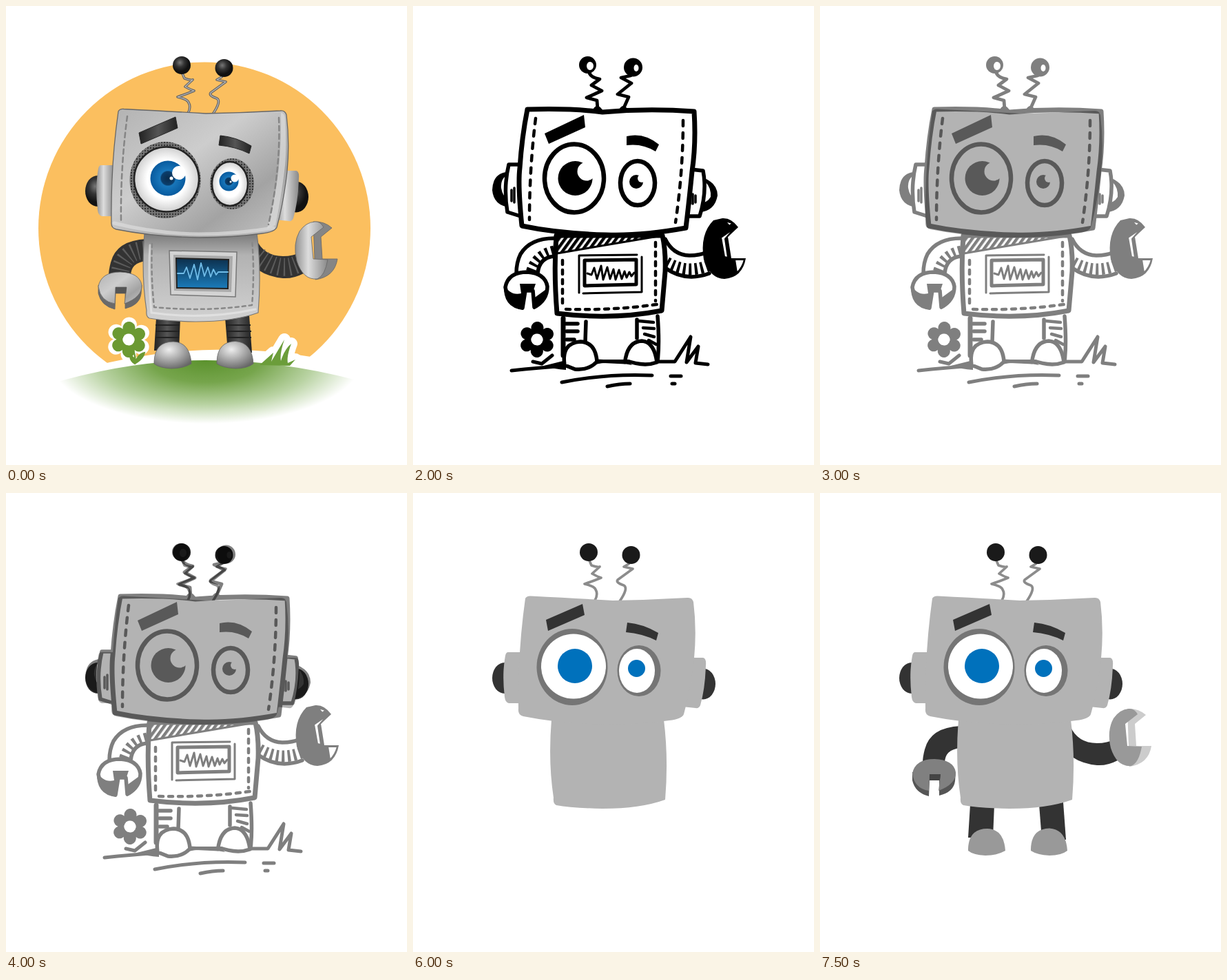
Write an HTML page that moves like this. It is 582 px wide and 666 px high and loops after 8 s.

```html
<!DOCTYPE html>
<html lang="en">
<head>
<meta charset="utf-8">
<title>Drawing a robot</title>
<style>
html, body { margin: 0; width: 100%; height: 100%; overflow: hidden; background: #fff; }
svg { display: block; width: 100%; height: 100%; }
.line { fill: none; stroke-linecap: round; stroke-linejoin: round; }
.pen { fill: #fff; stroke-linecap: round; stroke-linejoin: round; }
.open { fill: none; }
#ink { stroke: #000; stroke-width: 5.5; mix-blend-mode: multiply; }
#red { stroke: #b51f29; stroke-width: 5.5; }
.solid { fill: #000; stroke: none; }
.blood { fill: #b51f29; stroke: none; }
.white { fill: #fff; stroke: none; }
</style>
</head>
<body>
<svg viewBox="0 0 582 666">
<defs>
  <linearGradient id="steel" x2="1" y2="1"><stop stop-color="#b2b2b2"/><stop offset=".4" stop-color="#cdcdcd"/><stop offset=".72" stop-color="#a3a3a3"/><stop offset="1" stop-color="#c6c6c6"/></linearGradient>
  <linearGradient id="chest" x2="0" y2="1"><stop stop-color="#777"/><stop offset=".25" stop-color="#b2b2b2"/><stop offset="1" stop-color="#d2d2d2"/></linearGradient>
  <linearGradient id="plate"><stop stop-color="#909090"/><stop offset=".4" stop-color="#ddd"/><stop offset="1" stop-color="#888"/></linearGradient>
  <linearGradient id="rubber"><stop stop-color="#222"/><stop offset=".5" stop-color="#555"/><stop offset="1" stop-color="#222"/></linearGradient>
  <linearGradient id="screen" x2="0" y2="1"><stop stop-color="#0c2f4c"/><stop offset="1" stop-color="#1b7cbb"/></linearGradient>
  <radialGradient id="ball" cx=".4" cy=".35"><stop stop-color="#777"/><stop offset=".5" stop-color="#333"/><stop offset="1" stop-color="#111"/></radialGradient>
  <radialGradient id="toe" cx=".4" cy=".3" r=".75"><stop stop-color="#eee"/><stop offset=".5" stop-color="#aaa"/><stop offset="1" stop-color="#666"/></radialGradient>
  <radialGradient id="eyeball"><stop offset=".6" stop-color="#fff"/><stop offset="1" stop-color="#cfcfcf"/></radialGradient>
  <radialGradient id="iris"><stop stop-color="#0a2c4c"/><stop offset=".38" stop-color="#0b3e6c"/><stop offset=".45" stop-color="#1977bb"/><stop offset="1" stop-color="#075a9e"/></radialGradient>
  <radialGradient id="meadow" gradientUnits="userSpaceOnUse" cx="0" cy="0" r="1" gradientTransform="translate(290 514) scale(226 92)"><stop stop-color="#5b922d"/><stop offset=".35" stop-color="#76a54c"/><stop offset=".7" stop-color="#b9d3a3"/><stop offset="1" stop-color="#fff"/></radialGradient>
  <pattern id="hatch" width="7.5" height="8" patternUnits="userSpaceOnUse" patternTransform="rotate(36)"><path d="M2 0V8" stroke="#000" stroke-width="4.8"/></pattern>
  <pattern id="mesh" width="4" height="4" patternUnits="userSpaceOnUse"><path d="M0 0h4v4h-4z" fill="#777"/><circle cx="2" cy="2" r="1.2" fill="#333"/></pattern>

  <path id="head" d="M163 153Q165 149 171 149.500Q240 153 290 156Q345 155 398 152Q405 151 407 158Q412 198 408 240Q403 285 393 321Q390 328 372 330Q330 336 280 336Q215 335 160 324Q152 322 153 313Q152 230 163 153Z"/>
  <path id="body" d="M201 329H364Q371 385 366 445Q330 458 275 458Q230 457 208 453Q203 451 204 442Q196 390 201 329Z"/>
  <path id="earL" d="M138 231H157V305H139Q134 304 133 296Q129 262 134 236Q135 231 138 231Z"/>
  <path id="earR" d="M405 239H421Q426 240 425 250Q424 284 417 308Q415 313 410 312L391 310Z"/>
  <path id="armL" d="M204 338Q160 340 152 372Q149 383 149 392H181Q181 372 204 370Z"/>
  <path id="armR" d="M363 338Q374 363 402 363Q417 363 428 357L432 388Q417 396 402 395Q381 393 366 383Z"/>
  <path id="legL" d="M218 452H253L251 500H215Z"/>
  <path id="legR" d="M318 452L353 449L357 503H322Z"/>
  <path id="footL" d="M215 516Q216 487 243 487Q267 488 269 519Q257 526 240 526Q222 525 215 519Z"/>
  <path id="footR" d="M306 516Q307 487 333 486.500Q357 488 359 519Q350 526 333 526Q315 525 306 519Z"/>
  <path id="clawL" d="M134 407Q138 386 166 386Q194 387 197 405Q198 422 172 432L175 408H159L158 432Q137 429 134 407Z"/>
  <path id="clawLSide" d="M134 405V417Q138 435 158 440L159 417H173V439Q194 434 196 418L197 405Z"/>
  <path id="clawR" d="M448 313Q456 312 461 321L443 335L446 367L467 368Q463 391 452 396Q431 398 422 370Q416 345 426 327Q435 314 448 313Z"/>
  <path id="clawRSide" d="M446 313Q462 312 473 322L457 335L459 367H481Q477 393 449 397Z"/>
  <path id="springs" d="M256 98L259 105Q267 108 271 107L260 117Q269 122 273 123Q261 128 249 132Q263 135 265 140Q269 147 264 156M313 103L306 107L319 110L297 126Q294 130 306 134Q313 138 300 157"/>
  <path id="browL" d="M193 184L246 161L249 177L196 200Z"/>
  <path id="browR" d="M311 188Q334 190 356 203L353 214Q333 204 309 202Z"/>
  <path id="wave" class="line" d="M249 388l9 0 4-9 5 16 6-20 5 22 5-24 5 19 5-13 4 14 4-11 4 8 3-4h14"/>
  <path id="scribble" class="line" d="M253 388l6 2 4-10 4 16 6-19 3 20 6-18 4 17 5-14 3 15 5-14 4 13 4-11 3 9 4-8 3 6 4-5"/>
  <g id="flower" fill="none" transform="rotate(30)"><circle r="17" stroke-width="18" stroke-linecap="round" stroke-dasharray="0 17.802"/><circle r="13" stroke-width="9"/><circle r="8.500" fill="#fff" stroke="none"/></g>
  <path id="grass" d="M368 521L388 503L385 516L404 484Q397 505 399 515Q404 498 414 490Q407 509 409 518L420 513L412 522Z"/>
</defs>

<path fill="#fff" d="M0 0H582V666H0Z"/>

<g id="flat" fill="#b3b3b3">
  <g data-show="6500 8000">
    <g fill="#333"><use href="#legL"/><use href="#legR"/></g>
    <g fill="#999"><use href="#footL"/><use href="#footR"/></g>
  </g>
  <g data-show="7000 8000" fill="#333"><use href="#armL"/><use href="#armR"/></g>
  <g data-show="7500 8000">
    <use href="#clawLSide" fill="#555"/><use href="#clawL" fill="#808080"/><path d="M159 408h16l-1 9h-15z" fill="#444"/>
    <use href="#clawRSide" fill="#ccc"/><use href="#clawR" fill="#999"/>
  </g>
  <use href="#body" data-show="6000 8000"/>
  <g data-show="3500 8000">
    <g fill="#333"><ellipse cx="133" cy="268.500" rx="18" ry="22.500"/><ellipse cx="421" cy="277" rx="18" ry="22.500"/></g>
    <use href="#earL"/><use href="#earR"/>
  </g>
  <g data-show="4000 8000">
    <use href="#springs" class="line" stroke="#8c8c8c" stroke-width="3.700"/>
    <g fill="#1a1a1a"><circle cx="255" cy="86" r="13"/><circle cx="316.500" cy="90" r="13"/></g>
  </g>
  <use href="#head" data-show="3000 8000"/>
  <g data-show="4500 8000">
    <g fill="#757575"><ellipse cx="231" cy="252.500" rx="51.500" ry="55.500"/><ellipse cx="328" cy="258" rx="31.500" ry="37"/></g>
    <g fill="#fff"><ellipse cx="233" cy="251.500" rx="47" ry="47"/><ellipse cx="325" cy="258" rx="26" ry="32"/></g>
    <g fill="#0071bc"><circle cx="235" cy="251" r="25"/><circle cx="324.500" cy="254.500" r="12.500"/></g>
  </g>
  <g data-show="5500 8000" fill="#333"><use href="#browL"/><use href="#browR"/></g>
</g>

<g id="ink" class="pen" data-show="2000 5000">
  <g class="open">
    <path d="M218 453V507" stroke-width="7"/>
    <path d="M251 458L250 487M222 461h17M223 472h16M223 484h11M325 455V482M355 450Q358 490 355 515"/>
    <path d="M328 457L349 459M334 467L350 468M336 476L350 480M342 485L353 491" stroke-width="4.500"/>
    <path d="M143 529Q180 525 224 522M266 515L308 517M352 516H380L403 480L397 517L414 494L410 518L428 520M216 546Q280 533 347 536M282 552Q300 548 315 548M374 537h15M376 548h4M174 516L187 519L202 507" stroke-width="5"/>
    <path d="M205 337Q170 337 156 360Q150 372 150 388M205 363Q183 365 181 388M366 338Q377 361 401 362Q416 362 427 357M366 380Q395 401 430 388"/>
    <path d="M205 356Q179 361 172 387M368 372Q397 389 428 377" stroke-width="17" stroke-linecap="butt" stroke-dasharray="4 4.500"/>
  </g>
  <path class="solid" d="M190 522L222 514V528Q205 527 190 522ZM262 513H308L318 521Q285 515 264 520Z"/>
  <path d="M220 521Q215 489 243 487Q265 488 267 516Q255 529 235 527ZM308 514Q312 487 332 486Q350 487 354 517Q335 524 308 514Z"/>
  <use href="#flower" x="180" y="484"/>
  <path d="M134 408Q138 386 166 386Q192 388 195 407Q195 427 176 437L174 413H163L159 438Q138 434 134 408Z"/>
  <path class="solid" d="M132 404Q141 421 157 417L155 403H178L174 415H164L160 441Q130 438 132 404ZM174 425L196 409Q194 433 175 440Z"/>
  <path class="solid" d="M449 308Q462 307 472 321L457 335L462 366H483Q478 394 452 396Q432 396 422 368Q416 331 436 311Z"/>
  <path d="M466 323L447 336L452 364L457 365L453 338ZM467 368H481Q478 380 470 387ZM453 312L464 315L459 319Z" stroke-width="2"/>
  <path d="M208 333Q204 385 209 446Q290 456 361 442L366 385Q367 355 362 333Z" stroke-width="7"/>
  <path d="M209 333H362L209 359Z" fill="url(#hatch)" stroke-width="3"/>
  <g class="open">
    <path d="M217 369V437M222 440Q290 442 354 433M352 343V428" stroke-width="4.500" stroke-dasharray="6 8"/>
    <path d="M241 416V362L325 361M332 364V415L247 417" stroke-width="3"/>
    <path d="M249 369L324 368V404L249 406Z" stroke-width="5"/>
    <use href="#scribble" stroke-width="3"/>
  </g>
  <path class="solid" d="M136 241Q116 243 115 267Q117 290 141 292Z"/><path class="white" d="M134 247Q127 253 128 264Q130 276 138 281V247Z"/>
  <path class="solid" d="M421 249Q442 257 442 275Q438 297 417 299Z"/><path class="white" d="M425 256Q433 264 432 277Q427 285 419 286Z"/>
  <path d="M153 230H139Q131 263 137 299L156 305M403 237L421 239Q427 270 416 305L396 305"/>
  <path class="open" d="M143 267v16M147 264v21M402 272v15M406 273v14M410 275v10" stroke-width="3.500"/>
  <path class="open" d="M256 97Q258 104 271 106L259 115L274 123L252 133L267 137L268 150M316 101L302 104L317 112L297 128L313 132L305 150" stroke-width="4.800"/>
  <path class="solid" d="M259 154Q267 136 277 154ZM297 154Q305 136 314 154Z"/>
  <g class="solid"><circle cx="253.500" cy="85.500" r="12.500"/><circle cx="319.500" cy="89" r="13.500"/></g>
  <g class="white"><ellipse cx="257" cy="87" rx="5" ry="6"/><ellipse cx="324" cy="90" rx="3.500" ry="5"/></g>
  <path d="M166 150Q230 148 275 154Q340 148 408 153Q411 200 405 240Q400 290 396 322Q330 334 280 332Q210 330 158 319Q152 260 155 235Q158 190 166 150Z" stroke-width="7"/>
  <path class="open" d="M178 163Q169 235 169 310M392 166Q392 240 381 314" stroke-width="4.500" stroke-dasharray="8 10"/>
  <g stroke-width="6.500"><ellipse cx="234" cy="250" rx="43" ry="49.500"/><ellipse cx="326" cy="257" rx="25" ry="32"/></g>
  <g class="solid"><circle cx="235.500" cy="250" r="25"/><circle cx="324" cy="255" r="10"/><path d="M191 185L248 158L250 176L197 200ZM310 189Q335 183 357 201L352 211Q333 199 310 202Z"/></g>
  <g class="white"><circle cx="252" cy="240" r="13.500"/><circle cx="332" cy="250" r="6"/></g>
</g>

<g data-show="1000 2000">
<use href="#red" transform="translate(2 -1.500)" opacity=".3"/>
<g id="red" class="pen">
  <g class="open">
    <path d="M217 455V500M245 456V487M325 455V482M354 450Q356 490 352 513"/>
    <path d="M221 462h23M220 471h24M222 480h18M327 461h24M329 472h23M333 482h18" stroke-width="5" opacity=".7"/>
    <path d="M142 526Q175 519 216 519M264 514L303 517M354 516H376M412 518L428 520"/>
    <path d="M376 517L390 503L387 516L404 480L397 517L413 494L410 518" stroke-width="7"/>
    <path d="M212 545Q275 530 348 536M276 550Q295 549 313 547M364 542h9" opacity=".65"/>
    <path d="M205 335Q168 336 154 360Q149 372 149 385M203 363Q180 368 179 386M366 340Q377 360 401 361Q416 361 426 356M366 379Q395 397 428 386" stroke-width="4.500"/>
    <path d="M203 350Q171 351 164 386M369 364Q395 381 427 372" stroke-width="23" stroke-linecap="butt" stroke-dasharray="3.500 5"/>
    <path d="M183 500V514" stroke-width="6"/>
  </g>
  <path d="M218 517Q214 486 242 485Q263 487 266 515Q252 523 235 522ZM304 514Q309 485 330 483Q350 486 353 516Q335 523 304 516Z"/>
  <use href="#flower" x="177" y="479" transform="translate(177 479) scale(.9) translate(-177 -479)" opacity=".85"/>
  <path d="M130 408Q136 384 164 384Q191 387 194 407Q193 423 176 431L174 405L157 405L158 435Q132 433 130 408Z"/>
  <path class="open" d="M136 414Q143 426 157 425M157 405L162 410V431M176 422Q190 419 193 407" stroke-width="5"/>
  <path d="M448 307Q460 305 467 320L447 333L453 364L480 362Q475 389 450 394Q430 393 422 366Q416 331 434 313Z"/>
  <path class="open" d="M461 316L441 333L445 365L462 368Q460 386 450 393" stroke-width="4"/>
  <path d="M207 333Q200 385 205 445Q290 454 360 443Q367 385 362 333Z"/>
  <path class="blood" opacity=".55" d="M211 330H362L352 340L211 356Z"/>
  <path class="open" d="M216 361V428M218 438L354 432M352 341V429" stroke-width="4" stroke-dasharray="13 7" opacity=".5"/>
  <g class="open"><path d="M240 359H328V412H240Z" stroke-width="3" opacity=".5"/><path d="M245 367H322V404H245Z"/><use href="#scribble" x="-4" y="-4" stroke-width="3.500" opacity=".85"/></g>
  <path d="M136 238Q115 240 114 263Q116 290 140 294M420 249Q439 256 438 273Q434 292 414 295"/>
  <path class="open" d="M127 243Q119 265 130 287M430 256Q434 273 424 291"/>
  <path d="M150 228H138Q131 262 137 296L152 302M405 237L419 240Q425 270 413 302L397 303M146 240Q142 265 148 292"/>
  <path class="blood" opacity=".65" d="M137 260h7v30h-7zM404 263h9l-3 30h-8z"/>
  <path class="open" d="M255 96L259 106L270 106L258 114L272 122L250 131L270 132L265 147M318 99L304 104L316 111L296 128L313 127L303 148"/>
  <path class="open" d="M260 110L271 115L258 121L271 127L262 133L268 143" opacity=".75"/>
  <circle cx="251" cy="84" r="10"/><circle cx="318" cy="86" r="10"/>
  <path class="white" d="M166 149L275 154L406 150Q409 230 393 327Q270 336 150 317Q150 210 166 149Z"/>
  <path class="open" d="M165 149Q220 145 275 153Q330 149 389 150M404 152Q410 210 404 245Q398 290 394 325M166 149Q158 190 154 235Q149 270 151 315Q210 331 280 332Q335 333 394 325"/>
  <path class="open" d="M174 160Q165 235 164 303M388 160Q388 240 377 314" stroke-width="4" stroke-dasharray="14 11" opacity=".5"/>
  <path class="open" d="M190 181L244 159L249 172L196 192ZM307 185Q330 186 356 197L354 207L305 199Z" stroke-width="4.500" opacity=".85"/>
  <ellipse cx="231" cy="247" rx="40" ry="46" stroke-width="8"/><ellipse cx="322" cy="254" rx="26" ry="32" stroke-width="7"/>
  <path class="open" d="M202 279Q226 299 254 280Q270 263 269 239M305 277Q324 295 341 274" opacity=".55" stroke-width="8"/>
  <g class="blood"><circle cx="233" cy="247" r="24" opacity=".75"/><circle cx="232" cy="247" r="14"/><circle cx="321" cy="253" r="9"/></g>
  <g class="white"><circle cx="248" cy="237" r="12"/><circle cx="325" cy="249" r="4"/></g>
</g>
</g>

<g data-show="0 1000">
  <circle cx="288" cy="322.500" r="241" fill="#fbbf5f"/>
  <path fill="#fff" d="M100 530Q288 475 480 516V640H100Z"/>
  <use href="#flower" x="178" y="484" stroke="#fff" transform="translate(178 484) scale(1.250) translate(-178 -484)"/>
  <use href="#grass" fill="#fff" stroke="#fff" stroke-width="18" stroke-linejoin="round"/>
  <path d="M62 549Q180 514 290 514Q405 514 520 546V610H62Z" fill="url(#meadow)"/>
  <path d="M185 500Q189 510 187 520M187 519Q180 515 180 507Q188 510 187 519Q191 505 201 503Q199 512 187 519" fill="#6b9932" stroke="#6b9932" stroke-width="2"/>
  <use href="#flower" x="178" y="484" stroke="#6b9932"/>
  <use href="#grass" fill="#6b9d3a"/>
  <g fill="url(#rubber)"><use href="#legL"/><use href="#legR"/></g>
  <path d="M217 463h35M217 472h35M217 481h34M320 463h35M321 472h35M322 481h34" stroke="#222" stroke-width="2"/>
  <g fill="url(#toe)" stroke="#666" stroke-width=".8"><use href="#footL"/><use href="#footR"/></g>
  <g fill="#333"><use href="#armL"/><use href="#armR"/></g>
  <path class="line" d="M201 354Q168 356 165 390M367 363Q400 390 429 371" stroke="#5c5c5c" stroke-width="26" stroke-dasharray="2 6" style="stroke-linecap:butt"/>
  <g stroke="#666" stroke-width=".8">
    <use href="#clawLSide" fill="#6a6a6a"/><use href="#clawL" fill="url(#steel)"/>
    <use href="#clawRSide" fill="#858585"/><use href="#clawR" fill="url(#plate)"/>
  </g>
  <path d="M159 408h16l-1 9h-15z" fill="#555"/>
  <g stroke="#777" stroke-width="1.200"><use href="#body" fill="url(#chest)"/></g>
  <path class="line" d="M209 347Q206 390 211 445Q288 456 362 440" stroke="#eee" stroke-width="3" opacity=".55"/>
  <path class="line" d="M212 345Q210 390 215 437Q290 444 357 434Q361 385 357 340" stroke="#888" stroke-width="2.500" stroke-dasharray="5 5"/>
  <path d="M237 355L335 357L333 422L239 419Z" fill="#d3d3d3" stroke="#777" stroke-width="1.500"/>
  <path d="M243 361L329 363L327 415L244 413Z" fill="#aaa"/>
  <path d="M247 366L323 368L322 410L248 409Z" fill="url(#screen)" stroke="#222" stroke-width="2"/>
  <use href="#wave" stroke="#70bce8" stroke-width="1.800"/>
  <g fill="url(#ball)"><ellipse cx="133" cy="268.500" rx="18" ry="22.500"/><ellipse cx="421" cy="277" rx="18" ry="22.500"/></g>
  <g fill="url(#plate)"><use href="#earL"/><use href="#earR"/></g>
  <use href="#springs" class="line" stroke="#666" stroke-width="3.700"/><use href="#springs" class="line" stroke="#bbb" stroke-width="1.200"/>
  <g fill="url(#ball)"><circle cx="255" cy="86" r="13"/><circle cx="316.500" cy="90" r="13"/></g>
  <use href="#head" fill="url(#steel)" stroke="#666" stroke-width="1.300"/>
  <path d="M399 155Q404 155 405 163Q408 210 404 240Q398 286 391 318L379 323Q401 245 399 155Z" fill="#e0e0e0" opacity=".65"/>
  <path class="line" d="M157 315Q215 330 280 331Q335 331 388 322" stroke="#ddd" stroke-width="5" opacity=".7"/>
  <path class="line" d="M176 160Q166 235 167 312M396 162Q399 235 381 317" stroke="#858585" stroke-width="2.500" stroke-dasharray="7 5"/>
  <g fill="url(#mesh)"><ellipse cx="231" cy="252.500" rx="51.500" ry="55.500"/><ellipse cx="328" cy="258" rx="32" ry="37"/></g>
  <g fill="url(#eyeball)" stroke="#222" stroke-width="2.500"><ellipse cx="233" cy="251.500" rx="47" ry="47"/><ellipse cx="325" cy="258" rx="26" ry="32"/></g>
  <g fill="url(#iris)"><circle cx="235" cy="250" r="25.500"/><circle cx="323.500" cy="254.500" r="14"/></g>
  <g fill="#fff"><circle cx="251" cy="242" r="10"/><circle cx="240" cy="250" r="2.500"/><circle cx="332" cy="250" r="5.500"/><circle cx="326" cy="255" r="1.500"/></g>
  <g fill="url(#rubber)" stroke="#292929"><use href="#browL"/><use href="#browR"/></g>
</g>
</svg>
<script>
const LOOP = 8000;
const ink = document.getElementById("ink");
const layers = [...document.querySelectorAll("[data-show]")].map(node => {
  const [start, end] = node.dataset.show.split(" ").map(Number);
  return { node, start, end };
});

function draw(now) {
  const time = now % LOOP;
  for (const { node, start, end } of layers) {
    node.style.display = time >= start && time < end ? "" : "none";
  }
  ink.style.opacity = time < 2500 ? 1 : 0.5;
  requestAnimationFrame(draw);
}
draw(performance.now());
</script>
</body>
</html>
```
